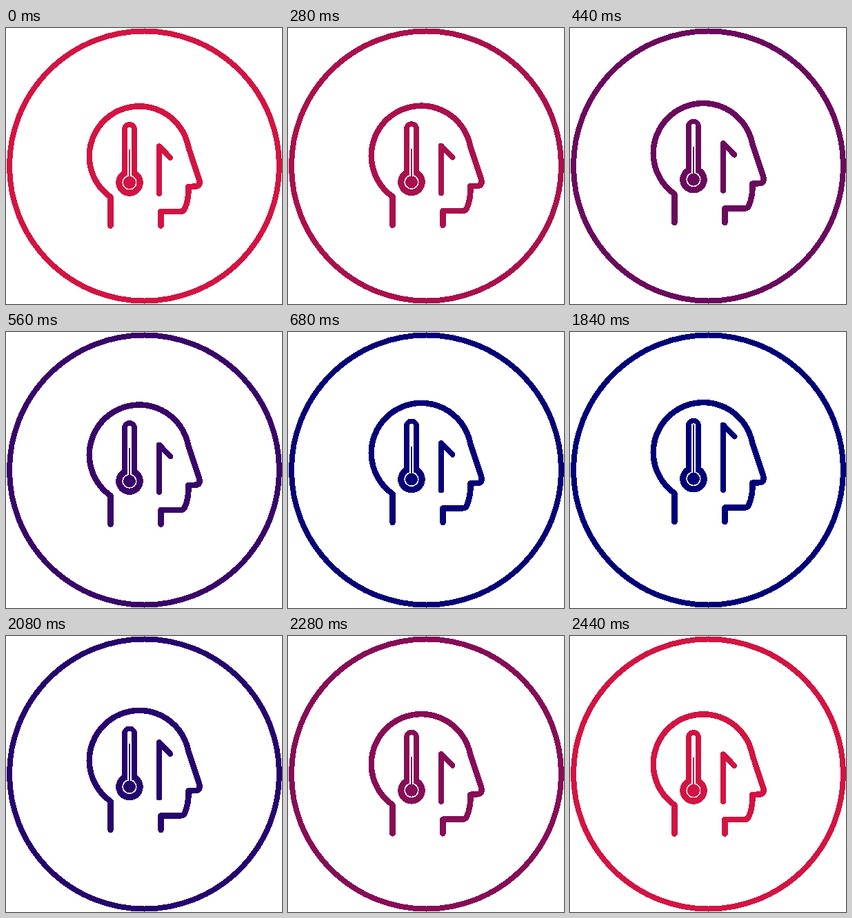
An HTML page that plays this animation: 400 by 400 pixels, repeating every 2640 ms.

```html
<!DOCTYPE html>
<html lang="en">
<head>
<meta charset="utf-8">
<title>Head with thermometer</title>
<style>
  html, body { margin: 0; width: 100%; height: 100%; overflow: hidden; background: #fff; }
  svg { display: block; width: 100vw; height: 100vh; shape-rendering: crispEdges; }
  .line { fill: none; stroke: currentColor; stroke-width: 8; stroke-linecap: round; stroke-linejoin: round; }
  .face { stroke-width: 8.5; }
  .ink { fill: currentColor; }
  .gap { fill: #fff; }
</style>
</head>
<body>
<svg id="icon" viewBox="0 0 400 400">
  <circle class="line" cx="200.5" cy="200" r="195.5"/>
  <g id="head">
    <path class="line face" d="M151.5 286.5V245A72.4 72.4 0 1 1 262.5 165Q264.5 174 267.5 182L280 219.5Q282.5 229 275 229.5L264.5 230Q265 249 259 262Q257.5 265.8 253 265.8H224.5V286.5"/>
    <path id="arrow" class="line"/>
    <rect class="ink" x="168" y="136" width="22" height="80" rx="11"/>
    <circle class="ink" cx="179" cy="224" r="19.8"/>
    <rect class="gap" x="176" y="143.5" width="6" height="76" rx="3"/>
    <circle class="gap" cx="179" cy="224" r="10.6"/>
    <circle class="ink" cx="179" cy="224" r="9"/>
    <rect id="mercury" class="ink" x="178" width="2.2"/>
  </g>
</svg>
<script>
const LOOP = 2640, STEP = 40;
const RED = [211, 20, 66], NAVY = [0, 0, 120];
const [icon, head, arrow, mercury] =
  ['icon', 'head', 'arrow', 'mercury'].map(id => document.getElementById(id));

const ramp = (t, from, to) => Math.min(1, Math.max(0, (t - from) / (to - from)));
const ease = (t, from, to) => (1 - Math.cos(Math.PI * ramp(t, from, to))) / 2;
// Goes 0 to 1 during the first span and back during the second.
const there = (f, t, a, b, c, d) => f(t, a, b) - f(t, c, d);

function draw(t) {
  const cool = there(ramp, t, 180, 700, 2000, 2440);
  const lift = 11.3 * there(ease, t, 185, 785, 1825, 2325);
  const grow = there(ease, t, 840, 1520, 1825, 2310);
  const reach = 25.5 * grow;
  const level = 48 + 31 * grow;

  const rgb = RED.map((v, i) => Math.round(v + (NAVY[i] - v) * cool));
  icon.style.color = `rgb(${rgb})`;
  head.setAttribute('transform', `translate(0 ${-lift})`);
  arrow.setAttribute('d', `M222 240V${171.3 - reach}L238.3 ${188.1 - reach}`);
  mercury.setAttribute('y', 224 - level);
  mercury.setAttribute('height', level);
}

const start = performance.now();
function tick() {
  const t = (performance.now() - start) % LOOP;
  draw(Math.floor(t / STEP) * STEP);
  requestAnimationFrame(tick);
}
tick();
</script>
</body>
</html>
```
